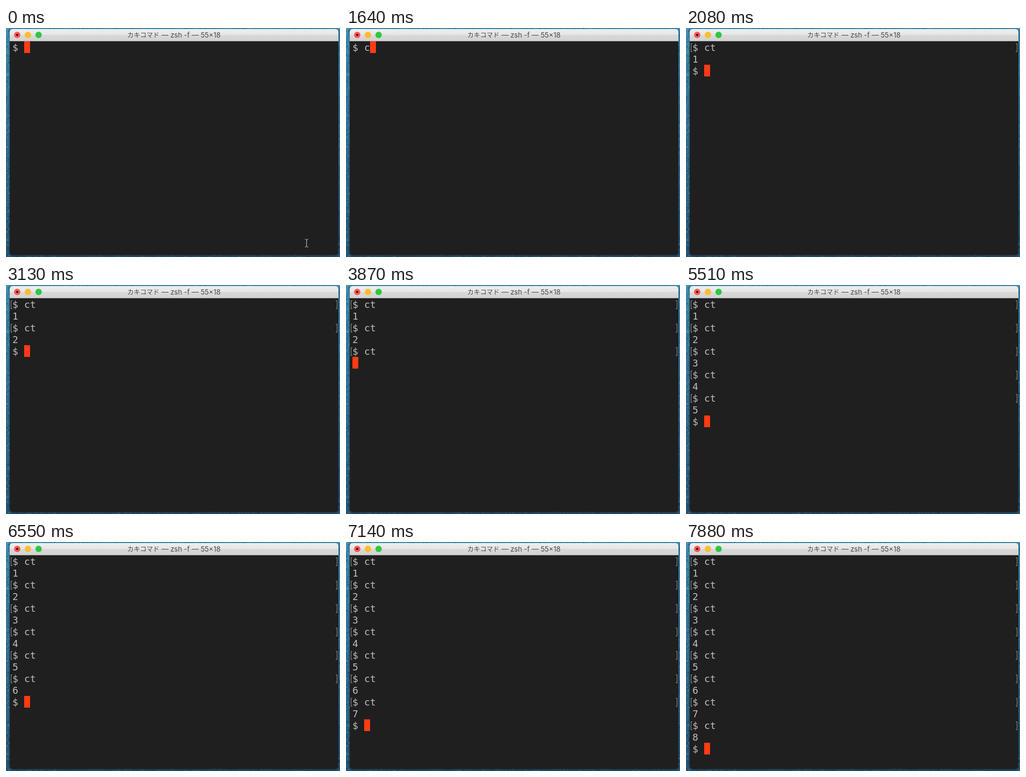
Recreate the animation shown at these times as an HTML page with a canvas. Size 625 by 430 pixels, loop 8 s.

```html
<!DOCTYPE html>
<html lang="ja">
<head>
<meta charset="utf-8">
<title>zsh</title>
<style>
  html, body { margin: 0; width: 100%; height: 100%; overflow: hidden; background: #2c6788; }
  canvas { display: block; }
</style>
</head>
<body>
<canvas id="stage" width="625" height="430"></canvas>
<script>
const W = 625, H = 430, LOOP = 8000;
const LEFT = 12, TOP = 25, CELL = 11, LINE = 22;
const MONO = '18px "DejaVu Sans Mono", monospace';
const POINTER_HIDE = 140;

// Per round: first key, second key, return, output
const rounds = [
  [1640, 1780, 2080, 2080],
  [2680, 2680, 3130, 3130],
  [3570, 3570, 3870, 4020],
  [4310, 4310, 4610, 4760],
  [5060, 5060, 5510, 5510],
  [5810, 5810, 6550, 6550],
  [6700, 6700, 7140, 7140],
  [7440, 7440, 7880, 7880]
];

const ctx = document.getElementById('stage').getContext('2d');
const backdrop = document.createElement('canvas');
backdrop.width = W;
backdrop.height = H;

function gradient(g, y0, y1, stops) {
  const fill = g.createLinearGradient(0, y0, 0, y1);
  stops.forEach(([at, color]) => fill.addColorStop(at, color));
  return fill;
}

function disc(g, x, y, r, color) {
  g.fillStyle = color;
  g.beginPath();
  g.arc(x, y, r, 0, Math.PI * 2);
  g.fill();
}

function paintDesktop(g) {
  let seed = 17;
  const rnd = () => (seed = seed * 16807 % 2147483647) / 2147483647;
  g.fillStyle = gradient(g, 0, H, [[0, '#3f8fb2'], [0.3, '#347a9d'], [0.7, '#2d688a'], [1, '#255574']]);
  g.fillRect(0, 0, W, H);
  for (let i = 0; i < 1100; i++) {
    const side = rnd();
    const x = side < 0.45 ? rnd() * 8 : side < 0.65 ? 621 + rnd() * 4 : rnd() * W;
    const y = side < 0.65 ? rnd() * H : side < 0.8 ? rnd() * 2 : 426 + rnd() * 4;
    g.fillStyle = rnd() < 0.5 ? 'rgba(120,190,215,0.16)' : 'rgba(10,40,70,0.18)';
    g.fillRect(Math.floor(x), Math.floor(y), 1 + rnd() * 2, 1 + rnd() * 3);
  }
}

function paintWindow(g) {
  g.save();
  g.shadowColor = 'rgba(0,0,0,0.45)';
  g.shadowBlur = 5;
  g.shadowOffsetY = 2;
  g.fillStyle = '#1f1f1f';
  g.beginPath();
  g.roundRect(7, 2, 615, 424, 5);
  g.fill();
  g.restore();

  g.save();
  g.clip();
  g.fillStyle = gradient(g, 2, 24, [
    [0, '#f5f5f5'], [0.08, '#ececec'], [0.5, '#e6e6e6'], [0.5, '#d9d9d9'], [1, '#d2d2d2']
  ]);
  g.fillRect(7, 2, 615, 22);
  g.fillStyle = '#a8a8a8';
  g.fillRect(7, 24, 615, 1);
  g.restore();

  disc(g, 21, 13, 6, '#fc5753');
  disc(g, 21, 13, 2.1, '#3c0705');
  disc(g, 41, 13, 6, '#fdbc30');
  disc(g, 61, 13, 6, '#2fc840');

  g.fillStyle = '#484848';
  g.font = '12px "Noto Sans CJK JP", "Noto Sans CJK", sans-serif';
  g.fillText('カキコマド', 227, 18);
  g.font = '13px Inter, sans-serif';
  g.fillText('— zsh -f — 55×18', 291, 18);
}

function put(text, col, row) {
  ctx.fillStyle = '#bfbfbf';
  [...text].forEach((ch, i) => ctx.fillText(ch, LEFT + (col + i) * CELL, TOP + row * LINE + 18));
}

function cursor(col, row) {
  ctx.fillStyle = '#ff3b16';
  ctx.fillRect(LEFT + col * CELL, TOP + row * LINE, CELL, LINE);
}

function brackets(row) {
  const y = TOP + row * LINE + 4;
  ctx.fillStyle = '#949494';
  for (const [bar, tick] of [[9, 9], [619, 617]]) {
    ctx.fillRect(bar, y, 1, 16);
    ctx.fillRect(tick, y, 3, 1);
    ctx.fillRect(tick, y + 15, 3, 1);
  }
}

function pointer() {
  ctx.strokeStyle = '#c8c8c8';
  ctx.lineWidth = 1;
  ctx.beginPath();
  ctx.moveTo(559.5, 396.5);
  ctx.quadraticCurveTo(562.5, 396.5, 562.5, 399);
  ctx.lineTo(562.5, 409);
  ctx.quadraticCurveTo(562.5, 411.5, 559.5, 411.5);
  ctx.moveTo(565.5, 396.5);
  ctx.quadraticCurveTo(562.5, 396.5, 562.5, 399);
  ctx.moveTo(562.5, 409);
  ctx.quadraticCurveTo(562.5, 411.5, 565.5, 411.5);
  ctx.stroke();
}

function paintSession(t) {
  ctx.font = MONO;
  for (let i = 0; i <= rounds.length; i++) {
    const row = i * 2;
    const [first, second, enter, output] = rounds[i] || [LOOP, LOOP, LOOP, LOOP];
    const typed = 'ct'.slice(0, (t >= first) + (t >= second));
    put('$ ' + typed, 0, row);
    if (t < enter) return cursor(2 + typed.length, row);
    brackets(row);
    if (t < output) return cursor(0, row + 1);
    put(String(i + 1), 0, row + 1);
  }
}

function draw(now) {
  const t = now % LOOP;
  ctx.drawImage(backdrop, 0, 0);
  paintSession(t);
  if (t < POINTER_HIDE) pointer();
}

const back = backdrop.getContext('2d');
paintDesktop(back);
paintWindow(back);

const start = performance.now();
function tick() {
  draw(performance.now() - start);
  requestAnimationFrame(tick);
}
tick();
</script>
</body>
</html>
```
